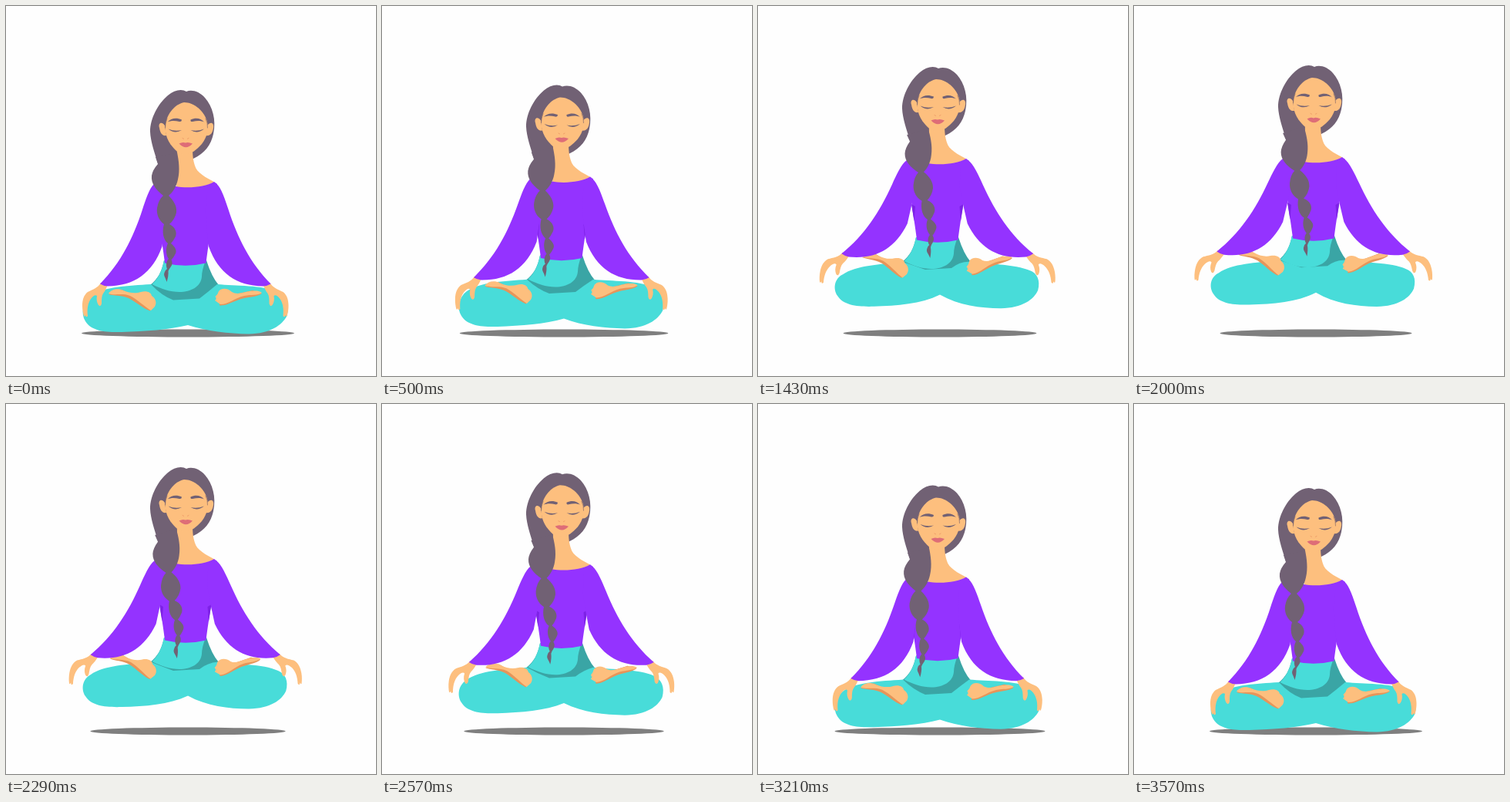
Write an HTML page that moves like this. It is 480 px wide and 480 px high and loops after 3.64 s.

```html
<!DOCTYPE html>
<html lang="en">
<head>
<meta charset="utf-8">
<title>Floating meditation</title>
<style>
html, body { margin: 0; width: 100%; height: 100%; overflow: hidden; background: #fefefe; }
svg { display: block; width: 100vw; height: 100vh; }
.skin { fill: #fdbf7e; }
.hair { fill: #716174; }
.shirt { fill: #9433ff; }
.under { fill: #7d22e6; }
.pants { fill: #48dcd9; }
.fold { fill: #3aa5a5; }
.sole { fill: #e6955a; }
.lips { fill: #de6d77; }
.line { fill: none; stroke: #715c66; stroke-linecap: round; }
</style>
</head>
<body>
<svg viewBox="0 0 480 480">
  <defs>
    <g id="arm">
      <path id="hand" class="skin" d="M123 359 C119 366 112 368 106 371 C101 375 99 381 99 389 C99 394 100 399 101 402 Q102 404 103 401 Q104 405 106 402 C105 393 106 386 110 380 C113 376 116 374 118 376 C117 381 118 385 120 388 Q123 391 124 386 C124 380 124 376 126 373 C129 369 130 366 132 362 Z"/>
      <path class="shirt" d="M192.500 230.500 C186 236 181 252 177 264 C165 301 149 333 122 360.500 Q126 363 132 363.500 C166 363 190 347 202.500 312 L205 290 L207 265 L204 240 Z"/>
    </g>
  </defs>

  <ellipse id="shadow" cx="236" cy="424.500" ry="5" fill="#7f7f7f"/>

  <g class="upper">
    <path class="fold" d="M205 330 C202 345 197 354 187 362 L205 384 H255 L276 362 Q267 352 260 330 Z"/>
    <path class="pants" d="M205 330 C202 345 197 354 189.500 361 C201 367 213 371 225 371 C240 371 253 364 254 351 Q254 343 259 330 Z"/>
  </g>

  <path id="legs" class="pants"/>

  <g id="footL">
    <path class="sole" d="M133 374 C139 376 150 375 159 379 C169 384 177 392 187 395.500 L190 386 L150 368 Z"/>
    <path class="skin" d="M133 373 C137 367 146 366 152 369 C161 373 169 373 175 371 C182 369 188 371 189 376 C194 379 196 385 193 390 L188 395 C181 391 171 381 161 376 C151 372 140 376 133 373 Z"/>
  </g>
  <g id="footR">
    <path class="sole" d="M332 373 C325 378 313 377 302 381 C291 385 285 389 277 388.500 L278 378 L320 369 Z"/>
    <path class="skin" d="M332 372 C327 368 317 370 311 371 C304 373 298 374 293 371 C288 366 280 365 276 370 Q275 374 271.500 377 Q274 380 271 382 L278 387 C289 387 296 379 309 376 C318 374 326 376 332 372 Z"/>
  </g>

  <g class="upper">
    <path class="hair" d="M234 111 C228 107 218 109 210 116 C197 127 187 146 187 163 C187.500 176 193 191 197 204 L199 210 L223 208 L243 198 C258 191 266 180 269 166 C273 148 268 130 258 119 C251 111 241 108 234 111 Z"/>
    <path class="skin" d="M222 184 L221 238 H247 L270.500 228.500 C260 223 247 216 245 207 C243 201 242 195 242 184 Z"/>
    <path class="skin" d="M231 125 C220 127 209 139 207 153 C205 167 211 178 219 186 C224 191 228 192.500 232 192.500 C240 192.500 248 186 254 179 C261 170 263 160 261 150 C257 136 244 125 231 125 Z"/>
    <path class="skin" d="M206 155 C202 149 197 152 199 158 C200 165 203 169 208 168 Z M261 155 C266 149 270 152 269 158 C268 165 265 169 259 168 Z"/>
    <path class="line" stroke-width=".6" d="M206.500 158 Q206.500 152 209 146 M261.500 158 Q262 152 259 146"/>
    <path class="hair" d="M209.500 150.500 C214 145.500 221 144.500 228 147.500 Q228 150.500 225 150 C219 148.500 214 148.500 209.500 150.500 Z M257 150.500 C253 145.500 246 144.500 239.500 147.500 Q239 150.500 242 150 C248 148.500 253 148.500 257 150.500 Z"/>
    <path class="hair" d="M210.500 159.500 Q219 163 228 161 Q219 166.500 210.500 159.500 Z M239.500 161 Q248 163 257 159.500 Q248 166.500 239.500 161 Z"/>
    <path class="line" style="stroke:#ef9d69" stroke-width="1" d="M229 171.500 L230.500 172.300 M235.500 172.300 L237 171.500"/>
    <path class="lips" d="M224.500 178.500 Q229 176 233 177.500 Q236 176 242 178.500 Q233.500 188 224.500 178.500 Z"/>

    <path class="shirt" d="M192 231 L205 229 C222 238 254 237 270 228 L274 231 L269 265 L265.500 292 Q261 320 259.500 333.500 Q233 340 206 333.500 Q204.500 320 200 292 L197 265 Z"/>
    <path class="under" d="M199 287 L204 290 L202.500 309 Z M266.500 287 L261.500 290 L263 309 Z"/>
    <g id="armL"><use href="#arm"/></g>
    <g id="armR"><use href="#arm" transform="matrix(-1 0 0 1 465.500 0)"/></g>

    <g id="braid" class="hair">
      <path d="M194 196 L222 190 C224 200 226 213 223 225 C221 235 216 242 211 246 C218 253 222 260 221 268 Q219 277 212 283 C220 287 222 294 220 299 Q217 305 214 308 C219 312 222 317 220 321 Q217 327 214.500 329 Q217 334 214 338 Q211 342 210.500 344 Q211 350 208.500 358 C207 352 204 350 205.500 346 Q206 343 209 341 C207 336 208 331 211 328 C207 322 207 314 210 308 C204 303 202 293 205 283 C198 278 195 270 196 262 Q198 251 204 246 C194 238 188 230 189 220 Q190 213 197 205 Z"/>
    </g>
  </g>
</svg>
<script>
const LOOP = 3640, STEP = 71.4, HALF = 25;
const el = id => document.getElementById(id);
const uppers = document.querySelectorAll(".upper");
const move = (node, value) => node.setAttribute("transform", value);

function legPath(p) {
  const lift = amount => y => y - amount * p;
  const low = lift(37), knee = lift(35), top = lift(31), hip = lift(32.5), mid = lift(44);
  const right = 366.5 - 1.5 * p;
  return `M188 ${hip(361)} C158 ${top(363)} 127 ${top(364)} 110 ${top(376)}
    C99 ${knee(385)} 97 ${low(400)} 103 ${low(409)} C111 ${low(422)} 130 ${low(423.5)} 150 ${low(423)}
    C181 ${low(422)} 211 ${low(420)} 236 ${mid(414)}
    C261 ${low(422)} 288 ${low(425)} 315 ${low(425.5)} C343 ${low(425)} 358 ${low(414)} ${right - 2} ${low(402)}
    C${right + 1.5} ${low(389)} ${right - 3} ${knee(378)} 353 ${top(371)} C333 ${top(362)} 298 ${top(363)} 274 ${hip(361)}
    Q262 ${mid(371)} 251 ${mid(379.5)} L217 ${mid(381.5)} Q202 ${mid(376)} 188 ${hip(361)} Z`;
}

function draw(ms) {
  const frame = Math.min(2 * HALF, Math.floor((ms % LOOP + 5) / STEP));
  const x = 1 - Math.abs(frame - HALF) / HALF;
  const p = x * x * (3 - 2 * x);
  uppers.forEach(g => move(g, `translate(0 ${-33.4 * p})`));
  move(el("armL"), `rotate(${7.2 * p} 197 235)`);
  move(el("armR"), `rotate(${-7.2 * p} 268.5 235)`);
  move(el("hand"), `rotate(${5 * p} 126 362)`);
  move(el("braid"), `rotate(${-6.2 * p} 205 205)`);
  move(el("footL"), `translate(0 ${-47.5 * p}) rotate(${6.5 * p} 188 390)`);
  move(el("footR"), `translate(0 ${-43.5 * p}) rotate(${-8 * p} 275 385)`);
  el("legs").setAttribute("d", legPath(p));
  el("shadow").setAttribute("rx", 138 - 14 * p);
}

const start = performance.now();
function tick(now) {
  draw(Math.max(0, now - start));
  requestAnimationFrame(tick);
}
draw(0);
requestAnimationFrame(tick);
</script>
</body>
</html>
```
